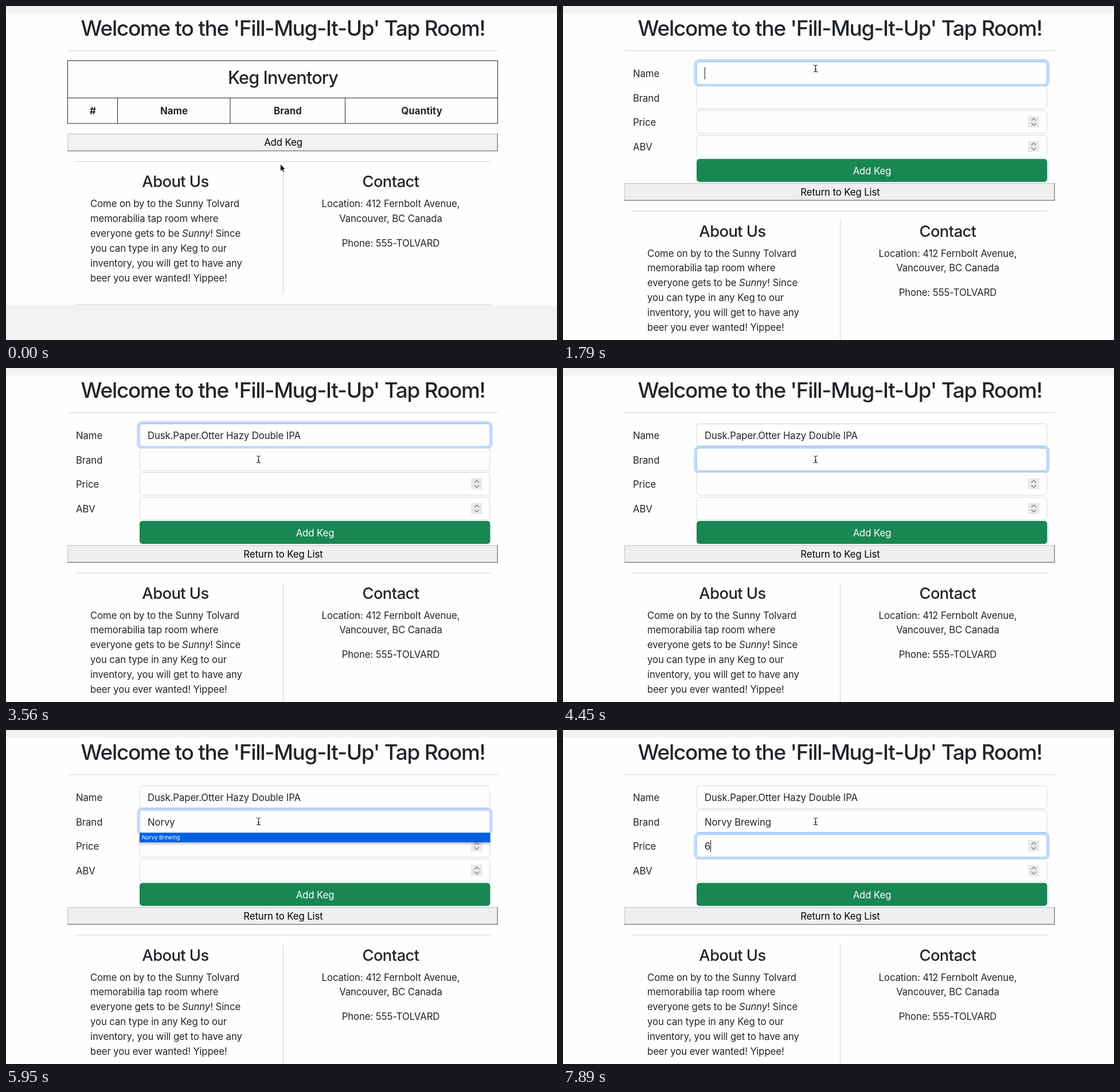
Recreate the animation shown at these times as an HTML page. Size 961 by 583 pixels, loop 8 s.

```html
<!DOCTYPE html>
<html lang="en">
<head>
<meta charset="utf-8">
<title>Tap Room</title>
<style>
  html, body { margin: 0; width: 100%; height: 100%; overflow: hidden; background: #fefefe; }
  svg { display: block; }
  text {
    font: 16.75px Inter, "Open Sans", sans-serif;
    font-optical-sizing: none;
    letter-spacing: -.006em;
    fill: #212529;
    white-space: pre;
  }
  .mid { text-anchor: middle; }
  .h1, .h2, .h3 { font-weight: 500; }
  .h1 { font-size: 37px; letter-spacing: -.035em; }
  .h2 { font-size: 30.6px; letter-spacing: -.028em; }
  .h3 { font-size: 27.4px; letter-spacing: -.021em; }
  .bold { font-weight: 700; letter-spacing: .006em; }
  .small { font-size: 9.6px; }
  .black { fill: #000; }
  .white { fill: #fff; }
  .rule { stroke: #d0d1d2; }
  .table { fill: none; stroke: #212529; }
</style>
</head>
<body>
<svg id="stage" width="961" height="583" viewBox="0 0 961 583"></svg>
<script>
const BEER = "Dusk.Paper.Otter Hazy Double IPA";
const BRAND = "Norvy Brewing";
const ROWS = { name: 97, brand: 139.5, price: 182, abv: 225 };
const FIELDS = Object.keys(ROWS);

const text = (x, y, value, cls = "") => `<text x="${x}" y="${y}" class="${cls}">${value}</text>`;
const line = (x1, y1, x2, y2, cls = "rule") =>
  `<line x1="${x1}" y1="${y1}" x2="${x2}" y2="${y2}" class="${cls}"/>`;
const rect = (x, y, w, h, attrs) => `<rect x="${x}" y="${y}" width="${w}" height="${h}" ${attrs}/>`;

function outsetButton(y, fill, label) {
  return rect(107, y, 751, 31, `fill="${fill}"`) +
    `<path d="M107.75 ${y + 30}V${y + .75}H857" fill="none" stroke="#cfcfcf" stroke-width="1.5"/>
     <path d="M107 ${y + 30.25}H857.25V${y}" fill="none" stroke="#858585" stroke-width="1.5"/>` +
    text(483.5, y + 21.5, label, "mid black");
}

function field(id, label) {
  const y = ROWS[id];
  const spinner = id === "price" || id === "abv"
    ? rect(811, y + 10.5, 19.5, 19.5, 'fill="#e9e9eb"') +
      `<path d="M817 ${y + 18}l4 -4l4 4M817 ${y + 22.5}l4 4l4 -4" fill="none" stroke="#777" stroke-width="1.2"/>`
    : "";
  return text(122, y + 27, label) +
    `<rect id="${id}-ring" fill="none" stroke="#0d6efd"/>` +
    rect(233, y + .5, 611, 39.5, `id="${id}-box" rx="5" fill="#fefefe"`) +
    spinner + text(247, y + 27, "", `value-${id}`);
}

const inventory =
  rect(107.5, 95.5, 750, 109.5, 'class="table"') +
  line(107.5, 160.5, 857.5, 160.5, "table") +
  [194.5, 391, 591.5].map(x => line(x, 160.5, x, 205, "table")).join("") +
  text(483, 136, "Keg Inventory", "mid h2") +
  [[151.5, "#"], [293, "Name"], [491.5, "Brand"], [725, "Quantity"]]
    .map(([x, label]) => text(x, 189, label, "mid bold")).join("") +
  outsetButton(222.5, "#f2f2f2", "Add Keg");

const form =
  FIELDS.map((id, i) => field(id, ["Name", "Brand", "Price", "ABV"][i])).join("") +
  rect(233, 267, 611.5, 40, 'rx="5" fill="#198754"') +
  text(539, 293.5, "Add Keg", "mid white") +
  outsetButton(309, "#efefef", "Return to Keg List");

const about = [
  "Come on by to the Sunny Tolvard",
  "memorabilia tap room where",
  'everyone gets to be <tspan font-style="italic">Sunny</tspan>! Since',
  "you can type in any Keg to our",
  "inventory, you will get to have any",
  "beer you ever wanted! Yippee!"
];

const footer =
  line(121, 271.5, 845, 271.5) +
  line(483.5, 288, 483.5, 503) +
  text(295.5, 316.3, "About Us", "mid h3") +
  about.map((row, i) => text(147, 351 + i * 25.9, row)).join("") +
  text(671, 316.3, "Contact", "mid h3") +
  text(671, 351, "Location: 412 Fernbolt Avenue,", "mid") +
  text(671, 376.9, "Vancouver, BC Canada", "mid") +
  text(671, 419.8, "Phone: 555-TOLVARD", "mid") +
  line(121, 521.5, 845, 521.5) +
  rect(0, 522, 961, 200, 'fill="#f2f2f2"');

const stage = document.getElementById("stage");
stage.innerHTML =
  `<defs><filter id="shade" x="-5%" y="-50%" width="110%" height="250%">
     <feDropShadow dx="0" dy="2.5" stdDeviation="2.2" flood-opacity=".28"/></filter></defs>` +
  rect(0, 0, 961, 583, 'fill="#fefefe"') +
  rect(0, 0, 961, 13, 'fill="#f2f2f2"') +
  text(483, 51.5, "Welcome to the 'Fill-Mug-It-Up' Tap Room!", "mid h1") +
  line(108, 78, 858, 78) +
  `<g id="inventory">${inventory}</g><g id="form">${form}</g><g id="footer">${footer}</g>` +
  `<rect id="caret" width="1.1" height="21" fill="#212529"/>
   <g id="popup">${rect(233, 0, 611.5, 16.5, 'id="option" filter="url(#shade)"')}
     ${text(237, 11.8, "", "small")}</g>
   <path id="arrow" d="M0 0V12.6L2.9 9.9L5 14.6L7.2 13.6L5.1 9.1H9Z" fill="#000" stroke="#fff" stroke-width=".9"/>
   <path id="beam" d="M-3.5 -6Q-.5 -6 0 -4.5Q.5 -6 3.5 -6M0 -4.5V4.5M-3.5 6Q-.5 6 0 4.5Q.5 6 3.5 6M-1.8 1.8H1.8"
     fill="none" stroke="#222" stroke-width="1.2"/>`;

const $ = id => document.getElementById(id);
const show = (node, on) => node.setAttribute("visibility", on ? "visible" : "hidden");
const arrow = (x, y) => ({ cursor: ["arrow", x, y] });
const beam = (x, y) => ({ cursor: ["beam", x, y] });
const focus = (name, brand, price) => ({ focus: { name, brand, price, abv: 0 } });
const popup = (row, tone, alpha = 1) => ({ popup: { row, tone, alpha } });
const closed = { popup: null };
const caret = row => ({ caret: row });

// Each step changes only the listed parts of the scene.
const steps = [
  [0, { page: "inventory", name: "", brand: "", price: "", abv: "" },
    focus(0, 0, 0), caret(null), closed, arrow(478.5, 276)],
  [450, arrow(478.5, 257)],
  [750, arrow(479.5, 243)],
  [1050, { page: "form" }, beam(480.5, 244)],
  [1190, beam(477, 205)],
  [1340, beam(460, 150)],
  [1490, beam(440.5, 109)],
  [1640, focus(.5, 0, 0), caret("name")],
  [1790, focus(1, 0, 0)],
  [2240, popup("name", "white"), caret(null)],
  [2390, arrow(440, 132)],
  [2540, arrow(440, 140), popup("name", "blue")],
  [2670, { name: BEER }, popup("name", "gray")],
  [2820, popup("name", "gray", .4)],
  [3120, closed, beam(440.5, 147), caret("name")],
  [3270, beam(440.5, 152)],
  [3420, beam(440.5, 157)],
  [3560, beam(440.5, 159.5), caret(null)],
  [3860, focus(.9, .1, 0), caret("brand")],
  [4010, focus(.5, .5, 0)],
  [4160, focus(0, 1, 0)],
  [4450, caret(null)],
  [4750, { brand: BRAND.slice(0, 1) }, caret("brand"), popup("brand", "white")],
  [4900, { brand: BRAND.slice(0, 3) }],
  [5050, { brand: BRAND.slice(0, 5) }],
  [5200, { brand: BRAND.slice(0, 6) }],
  [5650, caret(null)],
  [5950, popup("brand", "blue")],
  [6240, { brand: BRAND }, caret("brand"), popup("brand", "gray")],
  [6390, closed],
  [6840, focus(0, .9, .1), caret("price")],
  [6990, focus(0, .4, .4)],
  [7140, focus(0, 0, 1)],
  [7590, caret(null)],
  [7890, { price: "6" }, caret("price")]
];

const scenes = [];
for (const [time, ...changes] of steps) {
  scenes.push(Object.assign({}, scenes.at(-1), ...changes, { time }));
}

const TONES = { white: "#fefefe", blue: "#0060df", gray: "#e3e3e3" };
const mix = (from, to, k) => from.map((c, i) => Math.round(c + (to[i] - c) * k));

function drawField(id, scene) {
  const k = scene.focus[id], size = 4.2 * k;
  const attrs = {
    x: 232.5 - size / 2, y: ROWS[id] - size / 2,
    width: 612 + size, height: 40.5 + size,
    rx: 5 + size / 2, "stroke-width": size, "stroke-opacity": .25 * k
  };
  for (const key in attrs) $(id + "-ring").setAttribute(key, attrs[key]);
  const border = mix([211, 214, 218], [134, 183, 254], Math.min(1, k * 1.4));
  $(id + "-box").setAttribute("stroke", `rgb(${border})`);
  stage.querySelector(".value-" + id).textContent = scene[id];
}

function draw(scene) {
  const onForm = scene.page === "form";
  show($("inventory"), !onForm);
  show($("form"), onForm);
  $("footer").setAttribute("transform", `translate(0 ${onForm ? 86.5 : 0})`);
  FIELDS.forEach(id => drawField(id, scene));

  show($("caret"), scene.caret);
  if (scene.caret) {
    const value = stage.querySelector(".value-" + scene.caret);
    const width = scene[scene.caret] ? value.getComputedTextLength() : 0;
    $("caret").setAttribute("x", 246.7 + width);
    $("caret").setAttribute("y", ROWS[scene.caret] + 10);
  }

  show($("popup"), scene.popup);
  if (scene.popup) {
    const { row, tone, alpha } = scene.popup;
    const label = $("popup").querySelector("text");
    $("popup").setAttribute("transform", `translate(0 ${ROWS[row] + 40})`);
    $("popup").setAttribute("opacity", alpha);
    $("option").setAttribute("fill", TONES[tone]);
    label.textContent = row === "name" ? BEER : BRAND;
    label.style.fill = tone === "blue" ? "#fff" : "#111";
  }

  const [kind, x, y] = scene.cursor;
  for (const id of ["arrow", "beam"]) show($(id), id === kind);
  $(kind).setAttribute("transform", `translate(${x} ${y})`);
}

let current;
function tick() {
  const time = performance.now() % 8000;
  const scene = scenes.findLast(s => s.time <= time);
  if (scene !== current) draw(current = scene);
  requestAnimationFrame(tick);
}
tick();
</script>
</body>
</html>
```
